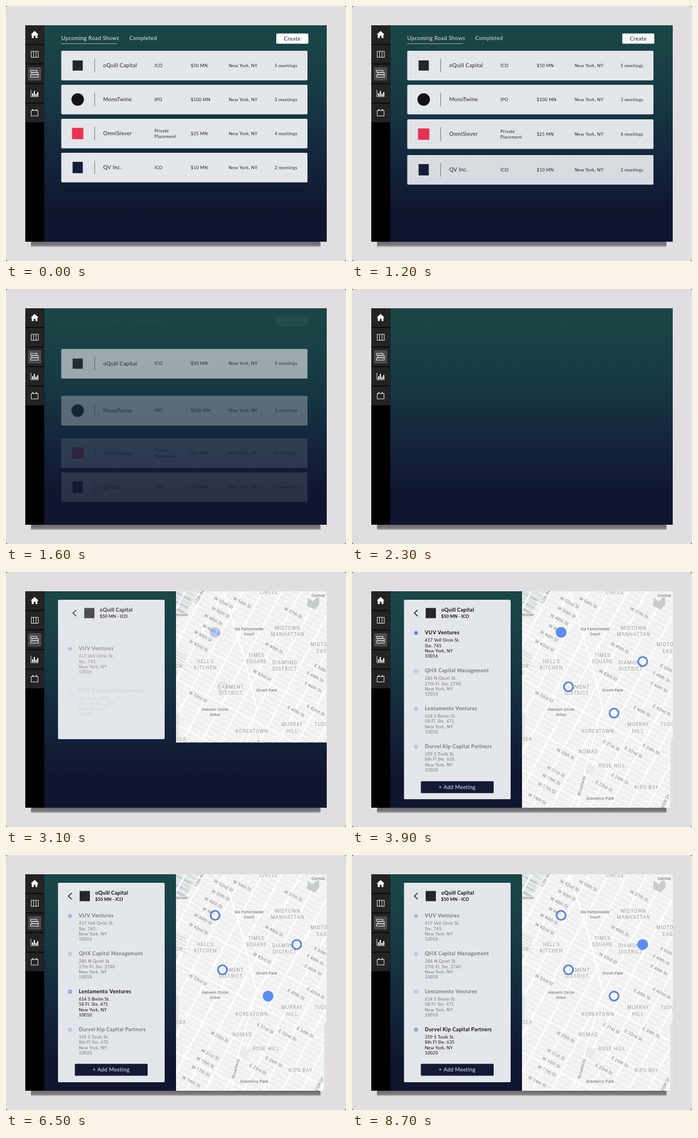
An HTML page with a canvas for the animation above (8.9 s loop, 600 px wide and 450 px high).

```html
<!DOCTYPE html>
<html lang="en">
<head>
<meta charset="utf-8">
<title>Road shows</title>
<style>
  html, body { margin: 0; width: 100%; height: 100%; overflow: hidden; background: #000; }
  canvas { display: block; }
</style>
</head>
<body>
<canvas id="stage" width="600" height="450"></canvas>
<script>
const ctx = document.getElementById('stage').getContext('2d');
const LOOP = 8900, STEP = 100;
const UI = 'Lato, sans-serif', MAP = 'Roboto, sans-serif';
const INK = '#24262c', BLUE = '#5b8cef', RING = '#5c87dc', PAPER = '#e3e6ea';

const shows = [
  { name: 'oQuill Capital', kind: ['ICO'], sum: '$50 MN', meetings: 5, y: 79, start: 1261, dur: 756 },
  { name: 'MonoTwine', kind: ['IPO'], sum: '$100 MN', meetings: 3, y: 139, start: 1173, dur: 756 },
  { name: 'OmniSiever', kind: ['Private', 'Placement'], sum: '$25 MN', meetings: 4, y: 199, start: 1085, dur: 756 },
  { name: 'QV Inc.', kind: ['ICO'], sum: '$10 MN', meetings: 2, y: 259, start: 986, dur: 900 }
];

const stops = [
  { name: 'VUV Ventures', lines: ['417 Vell Orrin St.', 'Ste. 745', 'New York, NY', '10016'], pin: [369, 106.5] },
  { name: 'QHX Capital Management', lines: ['286 N Quorl St.', '27th Fl. Ste. 2740', 'New York, NY', '10018'], pin: [382, 202.5] },
  { name: 'Lentamento Ventures', lines: ['614 S Brelm St.', '58 Fl. Ste. 471', 'New York, NY', '10010'], pin: [462.5, 249] },
  { name: 'Durvel Kip Capital Partners', lines: ['359 S Tovik St.', '8th Fl Ste. 635', 'New York, NY', '10020'], pin: [513, 158] }
];
const switches = [0, 4400, 5600, 6800, Infinity];
const SWITCH_TIME = 400;

const streets = [
  ['W 57th St', 507, 72], ['W 54th St', 417, 54], ['W 52nd St', 384, 54], ['W 50th St', 379, 71],
  ['W 48th St', 366, 84], ['W 46th St', 363, 102], ['W 44th St', 348, 113], ['W 42nd St', 340, 130],
  ['W 49th St', 473, 134], ['W 43rd St', 452, 182], ['W 33rd St', 339, 220], ['E 50th St', 559, 172],
  ['E 48th St', 546, 185], ['E 46th St', 542, 203], ['E 42nd St', 547, 244], ['E 40th St', 512, 246],
  ['E 34th St', 528, 313], ['E 32nd St', 497, 318], ['E 31st St', 458, 306], ['E 26th St', 473, 365],
  ['E 23rd St', 445, 378], ['W 25th St', 377, 321], ['W 21st St', 360, 352], ['W 19th St', 352, 366],
  ['W 17th St', 344, 381], ['W 14th St', 327, 400]
];
const districts = [
  ['CIRCLE', 464, 36], ['MIDTOWN', 497, 99], ['MANHATTAN', 497, 110], ['TIMES', 442, 147],
  ['SQUARE', 442, 158], ['DIAMOND', 492, 160], ['DISTRICT', 492, 171], ["HELL'S", 352, 158],
  ['KITCHEN', 352, 169], ['GARMENT', 397, 203], ['DISTRICT', 397, 214], ['KOREATOWN', 434, 281],
  ['MURRAY', 505, 269], ['HILL', 505, 281], ['TUDOR', 560, 269], ['MIDTOWN', 560, 128], ['EAST', 560, 140],
  ['NOMAD', 417, 317], ['ROSE HILL', 459, 342], ['KIPS BAY', 520, 380], ['CHELSEA', 297, 295],
  ['HUDSON', 293, 166], ['YARDS', 288, 178]
];
const places = [
  ['Six Farlornwide', 429, 100], ['Court', 429, 109], ['Orvell Park', 460, 208],
  ['Halvern Circle', 369, 242], ['Arbor', 369, 251], ['Gramercy Park', 438, 399],
  ['Central', 551, 41], ['Elmiver', 309, 75]
];

const sky = ctx.createLinearGradient(0, 34, 0, 416);
sky.addColorStop(0, '#1a4746');
sky.addColorStop(.3, '#173b44');
sky.addColorStop(.68, '#12213a');
sky.addColorStop(.85, '#11162f');
sky.addColorStop(1, '#11152f');

const clamp = v => Math.max(0, Math.min(1, v));
const linear = (t, start, dur) => clamp((t - start) / dur);
function ease(t, start, dur) {
  const p = linear(t, start, dur);
  return p < .5 ? 4 * p ** 3 : 1 - 4 * (1 - p) ** 3;
}

function rect(x, y, w, h, color, r = 0) {
  ctx.fillStyle = color;
  ctx.beginPath();
  ctx.roundRect(x, y, w, h, r);
  ctx.fill();
}
function path(points, color, width) {
  ctx.beginPath();
  points.forEach(p => ctx.lineTo(...p));
  ctx.strokeStyle = color;
  ctx.lineWidth = width;
  ctx.stroke();
}
function polygon(points, color) {
  ctx.beginPath();
  points.forEach(p => ctx.lineTo(...p));
  ctx.fillStyle = color;
  ctx.fill();
}
function disc(x, y, r, color) {
  ctx.beginPath();
  ctx.arc(x, y, r, 0, 7);
  ctx.fillStyle = color;
  ctx.fill();
}
function ring(x, y, r, color, width) {
  ctx.beginPath();
  ctx.arc(x, y, r, 0, 7);
  ctx.strokeStyle = color;
  ctx.lineWidth = width;
  ctx.stroke();
}
// y is the vertical middle of the line
function text(str, x, y, size, color, { weight = 400, align = 'left', font = UI, space = .2, halo } = {}) {
  ctx.font = `${weight} ${size}px ${font}`;
  ctx.letterSpacing = space + 'px';
  ctx.textAlign = align;
  ctx.textBaseline = 'alphabetic';
  if (halo) {
    ctx.strokeStyle = halo;
    ctx.lineWidth = 2;
    ctx.strokeText(str, x, y + size * .36);
  }
  ctx.fillStyle = color;
  ctx.fillText(str, x, y + size * .36);
}
function layer(alpha, draw) {
  if (alpha <= 0) return;
  ctx.save();
  ctx.globalAlpha *= alpha;
  draw();
  ctx.restore();
}
function clipped(x, y, w, h, r, draw) {
  ctx.save();
  ctx.beginPath();
  ctx.roundRect(x, y, w, h, r);
  ctx.clip();
  draw();
  ctx.restore();
}
// Fades finished artwork as one group by laying the backdrop over it
const veil = (alpha, x, y, w, h) => layer(alpha, () => rect(x, y, w, h, sky));

function drawFrame() {
  rect(0, 0, 600, 450, '#000');
  rect(0, 0, 600, 450, '#e1dee1', 3);
  const shadow = ctx.createLinearGradient(0, 416, 0, 426);
  shadow.addColorStop(0, '#69686b');
  shadow.addColorStop(.65, '#7f7e81');
  shadow.addColorStop(1, '#e1dee1');
  rect(44, 416, 511, 10, shadow, 2);
  rect(34, 34, 532, 382, sky);
}

function drawSidebar() {
  rect(34, 34, 33.5, 382, '#000');
  for (let i = 0; i < 5; i++) rect(34, 34 + i * 34.5, 33.5, 33.3, '#232326');
  rect(39, 108, 23, 23.5, '#4b4b4e', 2);
  polygon([[50.5, 44], [57.5, 50.5], [55.5, 50.5], [55.5, 56.5], [52, 56.5], [52, 52.5],
    [49, 52.5], [49, 56.5], [45.5, 56.5], [45.5, 50.5], [43.5, 50.5]], '#fff');
  const line = '#e4e4e4';
  ctx.strokeStyle = line;
  ctx.lineWidth = 1;
  ctx.strokeRect(44.5, 80, 12.5, 10.5);
  path([[48.5, 80], [48.5, 90]], line, 1);
  path([[53, 80], [53, 90]], line, 1);
  ctx.strokeRect(43.5, 113.5, 11, 3.5);
  ctx.strokeRect(45.5, 117.5, 11.5, 3.5);
  ctx.strokeRect(43.5, 121.5, 13.5, 4);
  path([[44, 148], [44, 160], [57.5, 160]], line, 1);
  [[46, 5], [49, 9], [52, 4], [55, 7]].forEach(([x, h]) => rect(x, 159 - h, 2, h, '#fff'));
  ctx.strokeStyle = line;
  ctx.strokeRect(44.5, 184.5, 12, 9.5);
  rect(46.5, 182, 2, 3, line);
  rect(52.5, 182, 2, 3, line);
}

function drawLogo(index, x, y) {
  if (index === 0) rect(x - 9, y - 9, 18, 18, '#25262a');
  if (index === 1) disc(x, y, 11, '#101114');
  if (index === 2) rect(x - 10, y - 10, 20, 20, '#ea3352');
  if (index === 3) rect(x - 9, y - 10, 18, 20, '#161d38');
}

function drawCard(show, index, y) {
  const middle = y + 26;
  const small = (str, x, dy = 0) => text(str, x, middle + dy, 7.8, INK, { space: .25 });
  rect(97.5, y, 434.5, 52.3, PAPER, 2);
  drawLogo(index, 126.5, middle);
  rect(156, y + 14, 1, 24, '#77797e');
  text(show.name, 171.5, middle, 9.4, INK, { space: .3 });
  show.kind.forEach((word, n) => small(word, 262, (n - (show.kind.length - 1) / 2) * 10.6));
  small(show.sum, 326);
  small('New York, NY', 393);
  small(show.meetings + ' meetings', 474);
}

function drawList(t) {
  text('Upcoming Road Shows', 97.5, 57, 9.6, '#e6eeee', { space: .3 });
  text('Completed', 217.5, 57, 9.6, '#e6eeee', { space: .3 });
  rect(97.5, 66, 98.5, 1, '#9fb3b4');
  rect(477, 48.5, 56.5, 18, '#fff', 1.5);
  text('Create', 505, 57.5, 9.6, INK, { align: 'center', space: .25 });
  veil(ease(t, 1050, 700), 96, 46, 440, 24);
  shows.forEach((show, i) => {
    const gone = ease(t, show.start, show.dur), y = show.y + 74 * gone;
    if (gone === 1) return;
    drawCard(show, i, y);
    veil(gone, 96, y - 1, 438, 55);
  });
}

function drawMap() {
  rect(300, 34, 266, 382, '#f2f1f1');
  polygon([[300, 34], [341, 34], [321, 66], [300, 84]], '#dde2e2');
  for (let i = 0; i < 3; i++) path([[300, 38 + i * 13], [326 - i * 3, 50 + i * 13]], '#c3cccc', 4);
  ctx.save();
  ctx.translate(369, 106);
  ctx.rotate(.49);
  for (let i = -24; i < 46; i++) path([[-300, i * 8.8], [400, i * 8.8]], '#fcfcfc', i % 8 === 4 ? 3 : 1.4);
  for (let i = -8; i < 12; i++) path([[i * 30 + 10, -250], [i * 30 + 10, 420]], '#fff', 2.6);
  ctx.restore();
  path([[384, 34], [420, 150], [442, 240], [412, 345], [398, 416]], '#fff', 2.6);
  for (let i = 0; i < 5; i++) path([[300, 139 + i * 6], [318, 149 + i * 6]], '#dfe2e2', 2.5);
  polygon([[300, 246], [306, 250], [304, 300], [300, 310]], '#e6e8e8');
  polygon([[533, 45], [541, 52], [552, 42], [553, 57], [545, 66], [531, 60]], '#c8cdcd');
  polygon([[415, 338], [429, 344], [424, 360], [411, 354]], '#e9eaea');
  polygon([[562, 300], [566, 292], [566, 416], [561, 416]], '#dde3e2');

  const street = (str, x, y, angle) => {
    ctx.save();
    ctx.translate(x, y);
    ctx.rotate(angle);
    text(str, 0, 0, 8, '#7c7c7c', { align: 'center', font: MAP, space: .1, halo: '#fafafa' });
    ctx.restore();
  };
  streets.forEach(s => street(...s, .49));
  street('12th Ave', 342, 42, -1.05);
  street('Broadway', 405, 377, -1.3);
  street('FDR Dr', 553, 404, -1.15);
  districts.forEach(([str, x, y]) =>
    text(str, x, y, 8.4, '#9b9b9b', { align: 'center', font: MAP, space: .9, halo: '#f7f7f7' }));
  places.forEach(([str, x, y]) =>
    text(str, x, y, 7.2, '#7c7c7c', { weight: 500, align: 'center', font: MAP, space: .15, halo: '#f7f7f7' }));
}

const itemStart = i => 2870 + i * 130;
const selection = (t, i) =>
  (i ? ease(t, switches[i], SWITCH_TIME) : 1) - ease(t, switches[i + 1], SWITCH_TIME);

function drawPin(t, stop, i) {
  const [x, y] = stop.pin, chosen = selection(t, i);
  layer(linear(t, itemStart(i), 600), () => {
    layer(1 - chosen, () => {
      disc(x, y, 8, 'rgba(255,255,255,.5)');
      ring(x, y, 8, RING, 3);
    });
    layer(chosen, () => disc(x, y, 9.5, BLUE));
  });
}

function drawStop(t, stop, i) {
  const y = 107 + i * 66.9 + 36 * (1 - ease(t, itemStart(i), 600));
  const strength = .5 + .5 * selection(t, i);
  layer(linear(t, itemStart(i), 600) * strength, () => {
    if (i) ring(113, y + .5, 2.5, '#4f83e6', 1.4);
    else disc(113, y + .5, 3.2, '#4f83e6');
    text(stop.name, 128.5, y, 9, '#0c0d10', { weight: 700, space: .35 });
    stop.lines.forEach((line, n) => text(line, 128.5, y + 13.5 + n * 9.4, 7.7, '#0c0d10'));
  });
}

function drawPanel(t) {
  rect(91.5, 49, 188.5, 352, PAPER);
  const head = ease(t, 2722, 600);
  layer(head, () => {
    ctx.translate(40 * (1 - head), 0);
    path([[116, 67], [110, 72.5], [116, 78]], '#15161a', 1.5);
    drawLogo(0, 139, 72.5);
    text(shows[0].name, 157.5, 66.5, 9, '#0c0d10', { weight: 700, space: .25 });
    text('$50 MN - ICO', 157.5, 78, 7.6, '#0c0d10', { weight: 700, space: .1 });
  });
  stops.forEach((stop, i) => drawStop(t, stop, i));
  layer(linear(t, 3400, 450), () => {
    ctx.translate(0, 36 * (1 - ease(t, 3400, 600)));
    rect(121.5, 368.5, 128.5, 21, '#141a36', 1.5);
    text('+ Add Meeting', 185.5, 379, 9.4, '#eceef2', { align: 'center', space: .3 });
  });
}

function render(t) {
  drawFrame();
  if (t < 2100) drawList(t);
  const open = ease(t, 2300, 1385);
  if (open > 0) {
    clipped(300, 34, 266, 382 * open, 0, () => {
      drawMap();
      stops.forEach((stop, i) => drawPin(t, stop, i));
    });
    clipped(91.5, 49, 188.5, 352 * open, 2, () => drawPanel(t));
  }
  drawSidebar();
}

const began = performance.now();
function tick() {
  const t = (performance.now() - began) % LOOP;
  render(Math.floor(t / STEP) * STEP);
  requestAnimationFrame(tick);
}
tick();
</script>
</body>
</html>
```
